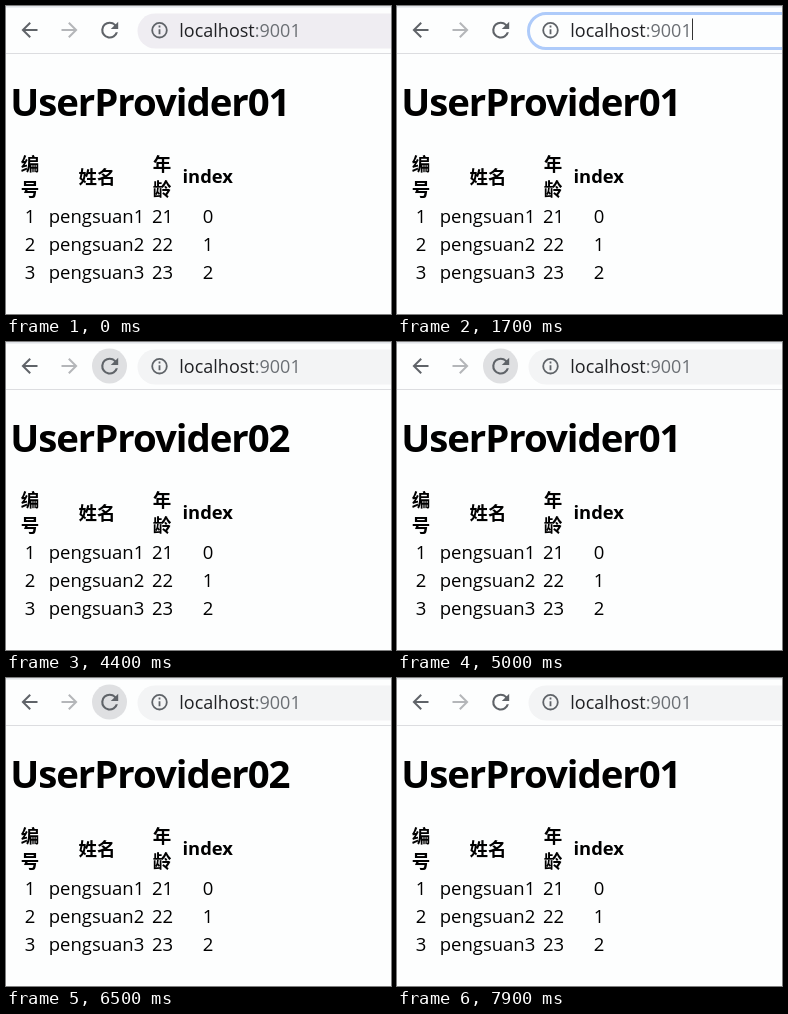
Animation of 385 by 308 pixels, one loop 8 s. Source, as an HTML page:

```html
<!DOCTYPE html>
<html lang="zh-CN">
<head>
<meta charset="utf-8">
<title>UserProvider</title>
<style>
  html, body { margin: 0; height: 100%; overflow: hidden; background: #fdfefe; }
  svg { display: block; width: 100%; height: 100%; }
  text { font-family: "Open Sans", "Noto Sans", sans-serif; font-size: 18.5px; fill: #000; }
  .title { font-size: 38.4px; font-weight: 700; letter-spacing: -.027em; }
  .head { font-weight: 700; font-size: 18.4px; text-anchor: middle; }
  .cjk { font-family: "Noto Sans CJK SC", "Noto Sans CJK", sans-serif; font-size: 18.5px; }
  .cell { text-anchor: middle; }
  .url { font-size: 18px; fill: #202124; }
  .port { fill: #6b6f74; }
  .selected .url, .selected .port { fill: #fff; }
</style>
</head>
<body>
<svg viewBox="0 0 385 308">
  <rect width="385" height="308" fill="#fdfefe"/>
  <rect width="385" height="1.5" fill="#dee1e6"/>
  <rect y="47" width="385" height="1" fill="#dcdde0"/>

  <defs><path id="arrow" d="M8 -1H-4.17L1.42 -6.59L0 -8L-8 0L0 8L1.41 6.59L-4.17 1H8z"/></defs>
  <use href="#arrow" transform="translate(23.5 24)" fill="#5f6368"/>
  <use href="#arrow" transform="translate(63.5 24) rotate(180)" fill="#b4b6b9"/>

  <circle id="hover" cx="103.5" cy="24" r="17.5" fill="#dfe0e2"/>
  <path id="reload" fill="#5f6368" transform="translate(91 11.4) scale(1.06)"
    d="M17.65 6.35A7.96 7.96 0 0 0 12 4a8 8 0 1 0 7.73 10h-2.08A6 6 0 1 1 12 6c1.66 0 3.14.69 4.22 1.78L13 11h7V4z"/>

  <rect id="pill" x="131.5" y="7.5" width="300" height="35" rx="17.5" stroke-width="3"/>
  <g id="info" fill="none" stroke="#5f6368" stroke-width="1.8">
    <circle cx="153.5" cy="24.2" r="7.3"/>
    <path d="M153.5 19.5v2M153.5 23.3v5"/>
  </g>
  <g id="address">
    <rect id="selection" x="174" y="13" width="121" height="23" fill="#0078d7"/>
    <text class="url" x="173.3" y="31">localhost<tspan class="port">:9001</tspan></text>
  </g>
  <rect id="caret" x="295" y="12.5" width="1" height="21.5" fill="#333"/>

  <text class="title" id="title" x="4.2" y="110"></text>
  <g id="table"></g>
</svg>
<script>
const LOOP = 8000;
const TITLE_FLIPS = [3400, 4000, 4400, 4600, 4800, 5000, 5200, 5400,
                     5600, 5800, 6100, 6300, 6500, 6700, 6900, 7200];
const $ = id => document.getElementById(id);

function addText(className, x, y, content) {
  const node = document.createElementNS("http://www.w3.org/2000/svg", "text");
  node.setAttribute("class", className);
  node.setAttribute("x", x);
  node.setAttribute("y", y);
  node.textContent = content;
  $("table").append(node);
}

[["编", 24, 165], ["号", 24, 190], ["姓名", 91, 177.5], ["年", 156, 165], ["龄", 156, 190]]
  .forEach(([label, x, y]) => addText("head cjk", x, y, label));
addText("head", 201.7, 177, "index");
for (let i = 0; i < 3; i++) {
  const row = [i + 1, "pengsuan" + (i + 1), 21 + i, i];
  row.forEach((value, col) => addText("cell", [24, 90.5, 156.5, 202][col], 217 + 28 * i, value));
}

const show = (id, visible) => $(id).setAttribute("visibility", visible ? "visible" : "hidden");

function render(t) {
  const during = (from, to) => t >= from && t < to;
  const focused = during(800, 2500);
  const selected = during(900, 1700);

  const pill = focused ? "#fdfefe" : t < 200 ? "#efedf2" : t < 800 ? "#e8eaed" : "#f3f4f5";
  $("pill").setAttribute("fill", pill);
  $("pill").setAttribute("stroke", focused ? "#aecbfa" : "none");
  show("selection", selected);
  $("address").classList.toggle("selected", selected);
  show("caret", during(1700, 2200));

  show("hover", during(2600, 7600));
  $("reload").setAttribute("opacity", during(2300, 2500) || during(7600, 7900) ? .5 : 1);
  $("info").setAttribute("opacity", during(7300, 7600) ? .5 : 1);

  const flips = TITLE_FLIPS.filter(time => time <= t).length;
  $("title").textContent = "UserProvider0" + (1 + flips % 2);
}

const start = performance.now();
function tick() {
  render((performance.now() - start) % LOOP);
  requestAnimationFrame(tick);
}
tick();
</script>
</body>
</html>
```
